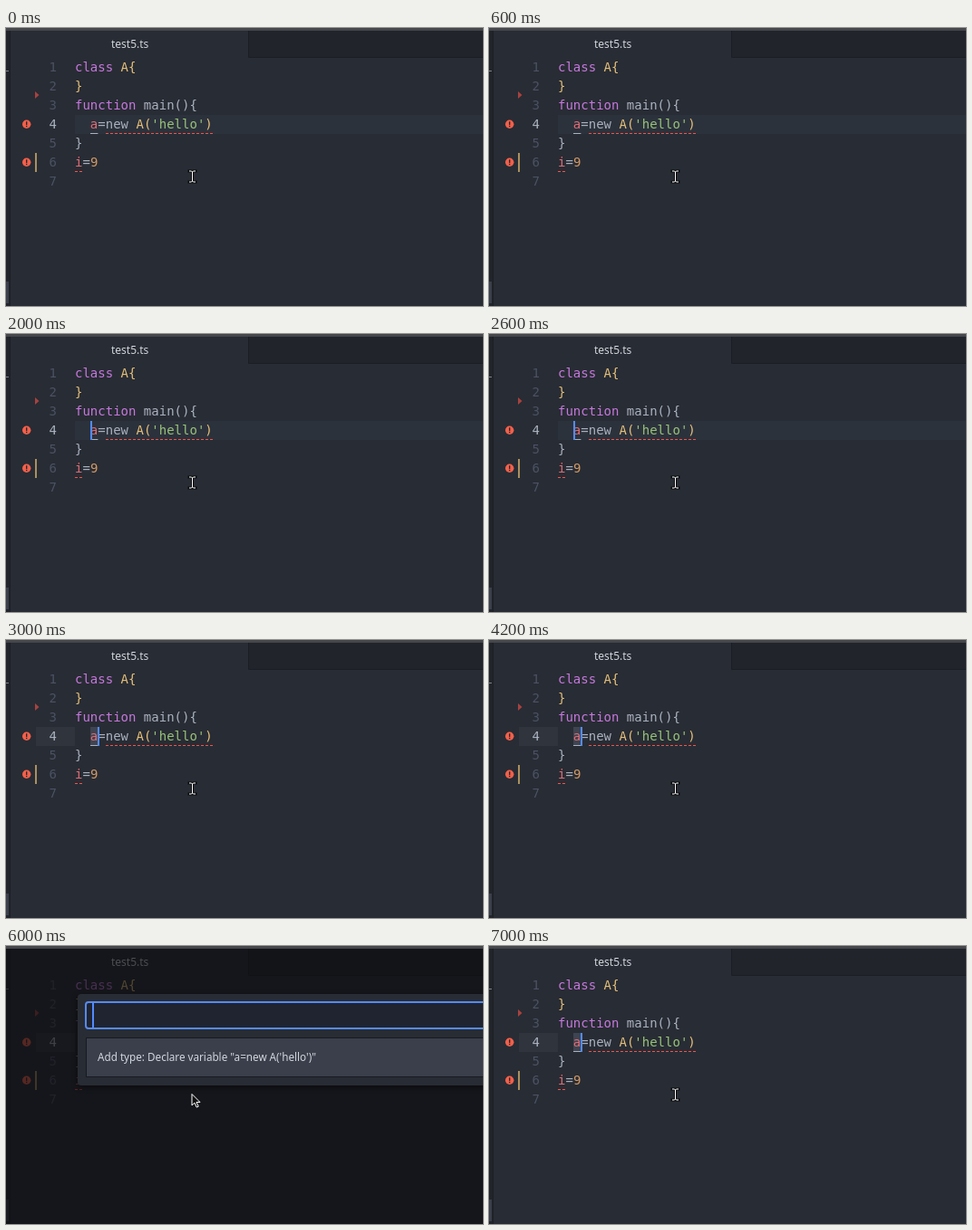
Write an HTML page that moves like this. It is 526x307 px and loops after 8000 ms.

```html
<!DOCTYPE html>
<html lang="en">
<head>
<meta charset="utf-8">
<style>
  html, body { margin: 0; width: 100%; height: 100%; overflow: hidden; background: #282c34; }
  svg { display: block; width: 526px; height: 307px; }
  .code { font: 14px "DejaVu Sans Mono", monospace; fill: #abb2bf; white-space: pre; }
  .ui { font: 12px "Noto Sans", sans-serif; fill: #d2d5dc; }
  .key { fill: #c678dd; }
  .type { fill: #e5c07b; }
  .name { fill: #e06c75; }
  .str { fill: #98c379; }
  .num { fill: #d19a66; }
  .lint { stroke: #f0544a; stroke-dasharray: 3 2; }
  .ref { stroke: #abb2bf; }
  .caret { fill: #528bff; }
</style>
</head>
<body>
<svg viewBox="0 0 526 307">
  <defs>
    <g id="alert">
      <circle r="4.7" fill="#f4604a"/>
      <path d="M-.7-3h1.4v3.6h-1.4zM-.7 1.5h1.4v1.4h-1.4z" fill="#282c34"/>
    </g>
    <filter id="blur" x="-10%" y="-20%" width="120%" height="140%"><feGaussianBlur stdDeviation="3"/></filter>
  </defs>

  <rect width="526" height="307" fill="#282c34"/>
  <rect width="4" height="307" fill="#21252b"/>
  <path d="M0 47.5h3" stroke="#7d838f"/>
  <rect y="280" width="3" height="24" fill="#3a3f4b"/>
  <path d="M4.5 3v304" stroke="#1c1f25"/>
  <rect x="268" y="3" width="258" height="30" fill="#21252b"/>
  <path d="M267.5 3v29.5H526" fill="none" stroke="#1b1e24"/>
  <text class="ui" x="116" y="22">test5.ts</text>

  <rect id="row" x="76" width="450" height="21" fill="#2c323c"/>
  <rect id="gutter" x="33" y="96" width="43" height="21" fill="#2f343d"/>
  <rect id="select" x="93" y="96" width="8.4" height="21" fill="#3e4451"/>
  <g id="numbers" class="code"></g>

  <path d="M32 70l4.5 4-4.5 4z" fill="#a8423f"/>
  <rect x="32" y="138" width="2" height="21" fill="#ab905f"/>
  <use href="#alert" x="22.7" y="106.3"/>
  <use href="#alert" x="22.7" y="148.3"/>

  <g class="code">
    <text x="76" y="48"><tspan class="key">class</tspan> <tspan class="type">A{</tspan></text>
    <text x="76" y="69" class="type">}</text>
    <text x="76" y="90"><tspan class="key">function</tspan> main(){</text>
    <text x="92.86" y="111"><tspan class="name">a</tspan>=new <tspan class="type">A(</tspan><tspan class="str">'hello'</tspan><tspan class="type">)</tspan></text>
    <text x="76" y="132">}</text>
    <text x="76" y="153"><tspan class="name">i</tspan>=<tspan class="num">9</tspan></text>
  </g>
  <path class="lint" d="M110 116.5h118M76 158.5h8.4"/>
  <path id="lintA" class="lint" d="M93 116.5h8.4"/>
  <path id="refA" class="ref" d="M93 116.5h8.4"/>
  <path id="refMain" class="ref" d="M152 95.5h34"/>
  <rect id="caret" class="caret" width="2" height="21"/>

  <path id="beam" d="M202 158h2.5l1 1 1-1h2.5M205.5 159v10M202 170h2.5l1-1 1 1h2.5" fill="none"/>

  <g id="dialog">
    <rect y="3" width="526" height="304" fill="#0c0d10" opacity=".68"/>
    <rect x="79" y="55" width="460" height="101" rx="4" opacity=".5" filter="url(#blur)"/>
    <rect x="79" y="53" width="460" height="101" rx="4" fill="#282c34"/>
    <rect x="88" y="62" width="460" height="29" rx="3" fill="#1f2430" stroke="#568af2" stroke-width="2"/>
    <rect x="88.5" y="101.5" width="460" height="43" fill="#3a3f4b" stroke="#181a1f"/>
    <text class="ui" x="101" y="127" style="font-size:11.7px">Add type: Declare variable "a=new A('hello')"</text>
    <rect id="inputCaret" class="caret" x="95" y="63" width="2" height="27"/>
    <path d="M205 163.500v12.500l3-2.800 2.200 4.900 2-.9-2.200-4.700h4z" fill="#111" stroke="#fff"/>
  </g>
  <rect width="526" height="3" fill="#45474b"/>
</svg>
<script>
  const $ = id => document.getElementById(id);
  const show = (id, on) => $(id).style.display = on ? '' : 'none';
  const place = (id, x, y) => { $(id).setAttribute('x', x); $(id).setAttribute('y', y); };

  for (let n = 1; n <= 7; n++)
    $('numbers').innerHTML += `<text x="47.500" y="${27 + 21 * n}">${n}</text>`;

  // White I-beam with a dark outline
  const beam = $('beam'), rim = beam.cloneNode();
  rim.removeAttribute('id');
  const beams = document.createElementNS('http://www.w3.org/2000/svg', 'g');
  beams.id = 'pointer';
  beam.replaceWith(beams);
  beams.append(rim, beam);
  rim.setAttribute('stroke', '#0b0c0e');
  rim.setAttribute('stroke-width', 3);
  rim.setAttribute('stroke-linecap', 'square');
  beam.setAttribute('stroke', '#fff');

  function draw(now) {
    const sec = Math.floor(now / 1000) % 8;
    const line = sec === 1 ? 3 : 4;
    const selected = sec >= 3;
    const dialog = sec === 5 || sec === 6;

    place('row', 76, 12 + 21 * line);
    show('row', !selected);
    show('gutter', selected);
    show('select', selected);
    show('lintA', line === 3);
    show('refA', line === 4);
    show('refMain', line === 3);
    place('caret', selected ? 101 : 93, 12 + 21 * line);
    show('caret', sec > 0 && !dialog);
    show('dialog', dialog);
    show('inputCaret', sec === 6);
    show('pointer', !dialog);
    [...$('numbers').children].forEach((num, i) =>
      num.style.fill = i + 1 === line ? '#abb2bf' : '#4b5263');
  }

  const start = performance.now();
  (function tick() {
    draw(performance.now() - start);
    requestAnimationFrame(tick);
  })();
</script>
</body>
</html>
```
